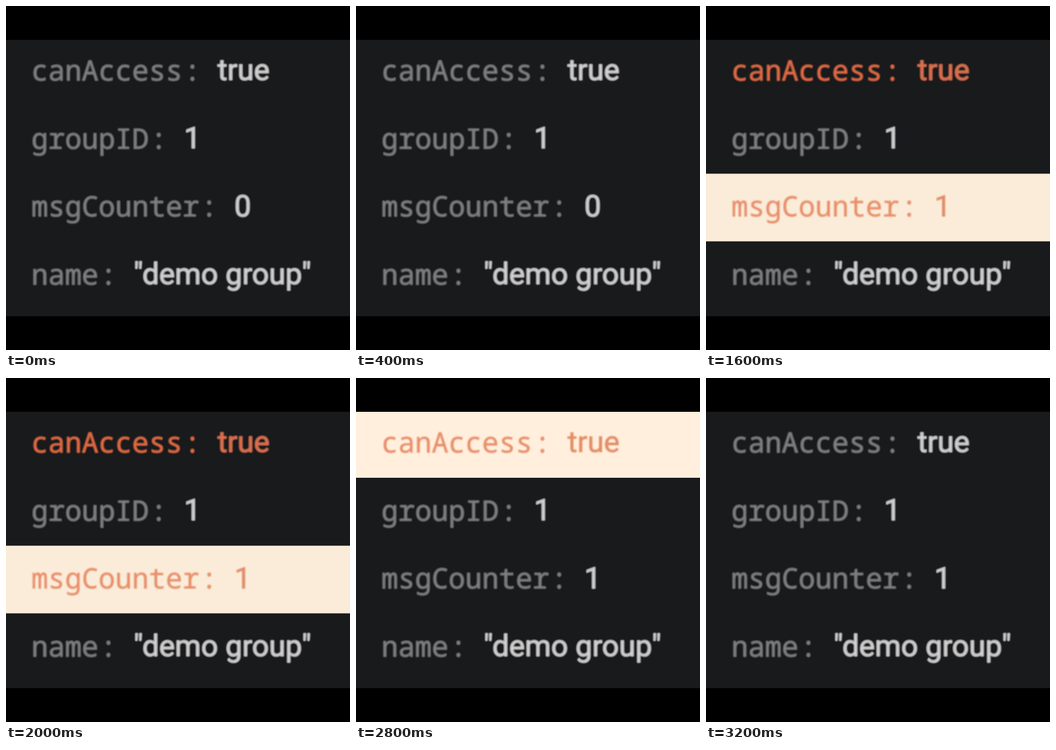
Animation, 600 px wide and 600 px high, one loop 3.6 s. Source, as an HTML page with a canvas:

```html
<!DOCTYPE html>
<html lang="en">
<head>
<meta charset="utf-8">
<title>Record fields</title>
<style>
  html, body { margin: 0; width: 100%; height: 100%; overflow: hidden; background: #000; }
  canvas { display: block; width: 600px; height: 600px; }
</style>
</head>
<body>
<canvas id="stage" width="600" height="600"></canvas>
<script>
const ctx = document.getElementById('stage').getContext('2d');
const LOOP = 3600;
const KEY_FONT = '48.8px "Noto Sans Mono", monospace';
const VALUE_FONT = '52px Roboto, sans-serif';
const LEFT = 44.2, ADVANCE = 29.3, ROW_STEP = 118.6;

const PLAIN = { key: '#828283', value: '#d6d5d5' };
const CHANGED = { key: '#e66c44', value: '#e07250' };
const FLASH = { key: '#e88d69', value: '#e28b66' };

// Each state lasts until its end time; strip is [top, height, colour].
const states = [
  { end: 800, access: 'true', count: '0', styles: {} },
  { end: 1600, access: 'false', count: '0', styles: {} },
  { end: 2400, access: 'true', count: '1', styles: { 0: CHANGED, 2: FLASH },
    strip: [292.5, 118, '#faecd9'] },
  { end: 3200, access: 'true', count: '1', styles: { 0: FLASH },
    strip: [59, 115, '#ffefdc'] },
  { end: LOOP, access: 'true', count: '1', styles: {} }
];

// A thin outline thickens the letters without changing their widths.
function drawText(text, x, y, font, colour, outline) {
  ctx.font = font;
  ctx.fillStyle = ctx.strokeStyle = colour;
  ctx.lineWidth = outline;
  ctx.fillText(text, x, y);
  ctx.strokeText(text, x, y);
}

function drawRow(index, key, value, style) {
  const y = 130.2 + index * ROW_STEP;
  const end = LEFT + key.length * ADVANCE;
  const outline = style === FLASH ? 0.4 : 1;
  drawText(key, LEFT, y, KEY_FONT, style.key, outline);
  drawText(':', end + 2.5, y, KEY_FONT, style.key, outline);
  drawText(value, end + ADVANCE + 31.8, y - 0.8, VALUE_FONT, style.value, outline * 1.5);
}

function draw(time) {
  const state = states.find(s => time < s.end);
  ctx.fillStyle = '#000';
  ctx.fillRect(0, 0, 600, 600);
  ctx.fillStyle = '#191a1c';
  ctx.fillRect(0, 59, 600, 482);
  if (state.strip) {
    const [top, height, colour] = state.strip;
    ctx.fillStyle = colour;
    ctx.fillRect(0, top, 600, height);
  }
  const rows = [
    ['canAccess', state.access],
    ['groupID', '1'],
    ['msgCounter', state.count],
    ['name', '"demo group"']
  ];
  ctx.filter = 'blur(1px)';
  rows.forEach(([key, value], i) => drawRow(i, key, value, state.styles[i] || PLAIN));
  ctx.filter = 'none';
}

ctx.lineJoin = 'round';
const start = performance.now();
function tick() {
  draw((performance.now() - start) % LOOP);
  requestAnimationFrame(tick);
}
tick();
</script>
</body>
</html>
```
